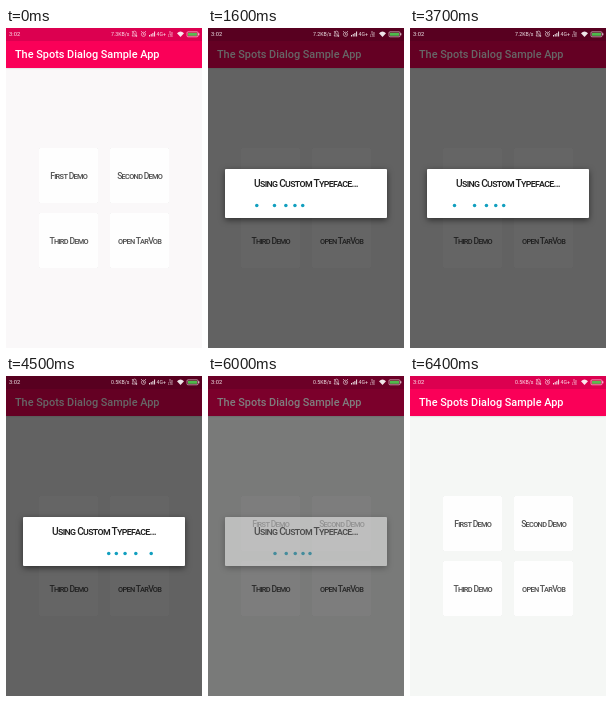
Write an HTML page that moves like this. It is 196 px wide and 320 px high and loops after 7300 ms.

```html
<!DOCTYPE html>
<html lang="en">
<head>
<meta charset="utf-8">
<title>Dots dialog</title>
<style>
html, body { margin: 0; width: 100%; height: 100%; overflow: hidden; background: #faf8f9; }
svg { display: block; width: 100%; height: 100%; font-family: Roboto, "Open Sans", sans-serif; }
.caps { font-variant: small-caps; text-anchor: middle; font-weight: 500; }
.label { font-size: 8.6px; letter-spacing: -.7px; fill: #555; }
.card { fill: #fefefe; filter: drop-shadow(0 .6px .7px #0003); }
.status { fill: #fff; font-size: 5.2px; opacity: .9; }
.line { fill: none; stroke: #fff; stroke-width: .6; }
</style>
</head>
<body>
<svg viewBox="0 0 196 320" preserveAspectRatio="none">
  <rect id="page" width="196" height="320"/>
  <rect y="2" width="196" height="38" fill="#fa0058" style="filter:drop-shadow(0 .7px .8px #0003)"/>
  <rect width="196" height="13" fill="#dc0050"/>
  <text x="9" y="30" font-size="10.9" font-weight="500" fill="#fff">The Spots Dialog Sample App</text>
  <g id="cards"></g>
  <rect id="dim" width="196" height="320"/>
  <g class="status">
    <text x="3" y="8.4" font-size="5.8">3:02</text>
    <text id="speed" x="105" y="8.2"></text>
    <path class="line" d="M126 8h5l-.8-1.2v-2a1.7 1.7 0 0 0-3.4 0v2zM126 3l5 6"/>
    <circle class="line" cx="137.5" cy="6.3" r="2.1"/>
    <path class="line" d="M137.5 5v1.5h1M135 4l1-1M140 4l-1-1"/>
    <path d="M143 8.5V7h1v1.5zM144.7 8.5V6h1v2.5zM146.4 8.5V5h1v3.5zM148.1 8.5V3.6h1v4.9z"/>
    <text x="150.5" y="8.3">4G+</text>
    <text x="163" y="5.6" font-size="3.3">Vo</text>
    <text x="162" y="8.5" font-size="3.3">LTE</text>
    <path d="M171 5.2Q174.5 2 178 5.2L174.5 9z"/>
    <rect class="line" x="181" y="3.8" width="11" height="5" rx="1"/>
    <path d="M182 4.8h9v3h-9z" fill="#4ccf50"/>
    <path d="M192.3 5.3h1v2h-1z"/>
  </g>
  <g id="dialog">
    <rect x="17" y="141" width="162" height="49" rx="1" fill="#fff" style="filter:drop-shadow(0 2px 3px #0008)"/>
    <text class="caps" x="98" y="159.2" font-size="10.2" letter-spacing="-.68" fill="#222">Using Custom Typeface...</text>
    <g id="dots" fill="#129fbf"></g>
  </g>
</svg>
<script>
const LOOP = 7300, STEP = 100, DOTS = 5, DELAY = 150, RUN = 1500;
const CYCLE = RUN + DELAY * (DOTS - 1);
const OPEN = 900, CLOSE = 5800, DOTS_START = 945, RATE = .99;
const LEFT = 31.5, SPAN = 136;
const $ = id => document.getElementById(id);

function ease(from, to, t) {
  const s = Math.min(1, Math.max(0, (t - from) / (to - from)));
  return s * s * (3 - 2 * s);
}

// Fast at both ends, slow in the middle
const hesitate = u => u < .5 ? Math.sqrt(2 * u) / 2 : 1 - Math.sqrt(2 - 2 * u) / 2;

$('cards').innerHTML = ['First Demo', 'Second Demo', 'Third Demo', 'open TarVob'].map((name, i) => {
  const x = 33 + i % 2 * 71, y = 120 + (i >> 1) * 65;
  return `<rect class="card" x="${x}" y="${y}" width="59" height="55" rx="1"/>
    <text class="caps label" x="${x + 29.7}" y="${y + 30.5}">${name}</text>`;
}).join('');
$('dots').innerHTML = '<circle cy="177.4" r="1.75"/>'.repeat(DOTS);
const dots = [...$('dots').children];

function draw(now) {
  const t = Math.floor(now % LOOP / STEP) * STEP;
  $('page').setAttribute('fill', t < OPEN + 300 ? '#faf8f9' : '#f5f7f5');
  $('dim').setAttribute('opacity', .6 * (ease(OPEN, OPEN + 350, t) - ease(CLOSE + 100, CLOSE + 500, t)));
  $('dialog').setAttribute('opacity', ease(OPEN, OPEN + 250, t) - ease(CLOSE, CLOSE + 400, t));
  $('speed').textContent = (t < 1100 ? '7.3' : t < 3900 ? '7.2' : '0.5') + 'KB/s';
  const phase = (t - DOTS_START) * RATE % CYCLE;
  dots.forEach((dot, i) => {
    const u = (phase - i * DELAY) / RUN;
    const shown = u >= 0 && u < 1;
    dot.setAttribute('visibility', shown ? 'inherit' : 'hidden');
    if (shown) dot.setAttribute('cx', LEFT + SPAN * hesitate(u));
  });
}

const start = performance.now();
function tick() {
  draw(performance.now() - start);
  requestAnimationFrame(tick);
}
tick();
</script>
</body>
</html>
```
